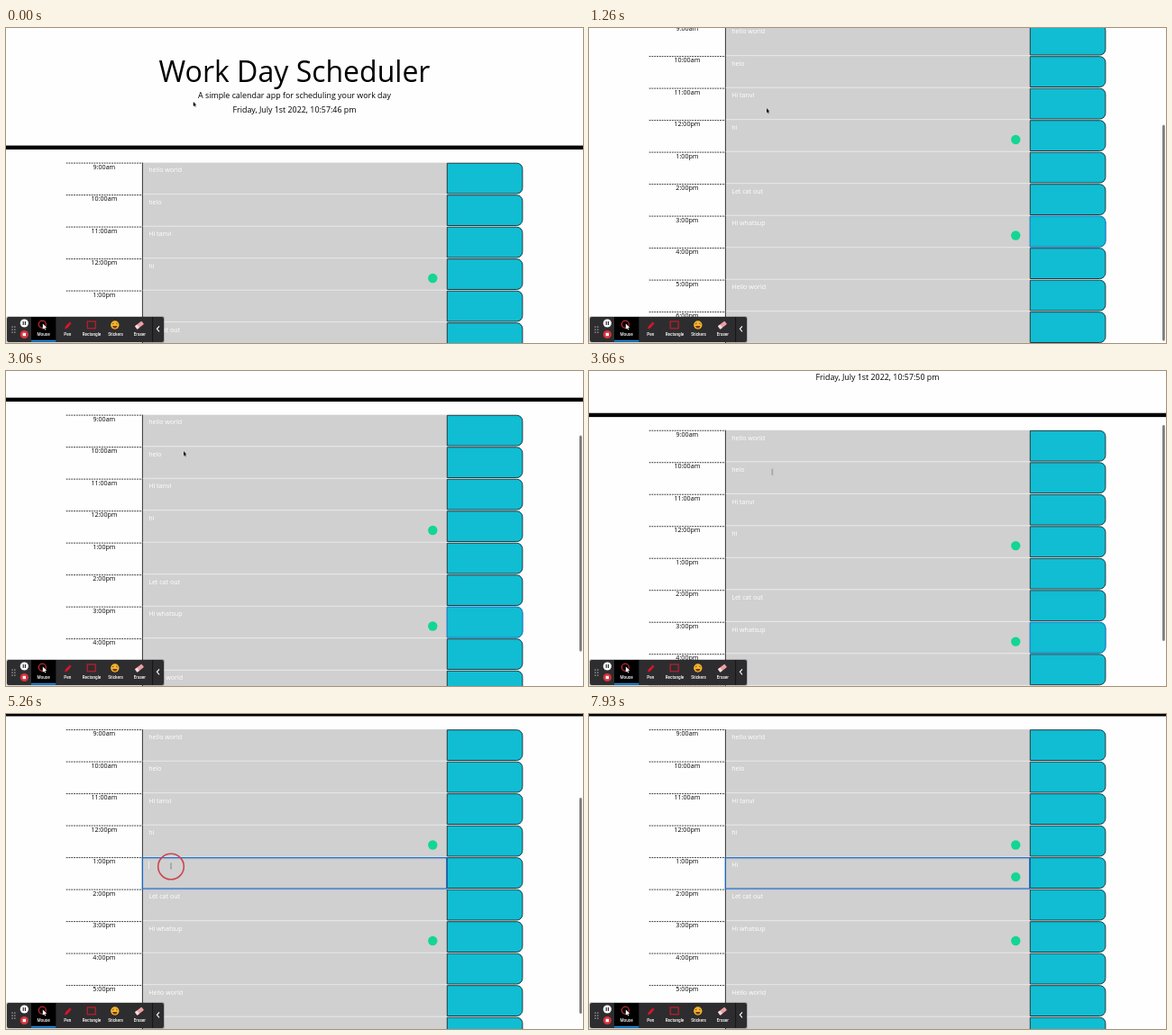
These frames come from a looping animation (640x350 px, 8000 ms). An HTML page:

```html
<!DOCTYPE html>
<html lang="en">
<head>
<meta charset="utf-8">
<title>Work Day Scheduler</title>
<style>
  @property --scroll { syntax: '<number>'; inherits: true; initial-value: 0; }

  html, body { margin: 0; width: 100%; height: 100%; overflow: hidden; background: #fff; }
  svg { display: block; width: 100vw; height: 100vh; font-family: 'Open Sans', sans-serif; }
  #stage { animation: scroll 8s linear infinite; }
  #page { transform: translateY(calc(var(--scroll) * -1px)); }
  /* Past the end of the page the fixed toolbar is dragged along. */
  #toolbar { transform: translateY(calc(max(0, var(--scroll) - 154) * -1px)); }
  #thumb { transform: translateY(calc(3px + min(154, var(--scroll)) * .68px)); animation: thumb 8s linear infinite; }
  #pointer { animation: pointer 8s ease-in-out infinite; }
  #arrow, #beam, #ring, #focus, #caret, #h, #i, #badge, #oldFocus { animation: 8s step-end infinite; }
  #arrow { animation-name: arrow; }
  #beam { animation-name: beam; }
  #ring { animation-name: ring; }
  #focus { animation-name: focus; }
  #oldFocus { animation-name: blur; }
  #caret { animation-name: caret; }
  #h { animation-name: typeH; }
  #i { animation-name: typeI; }
  #badge { animation-name: badge; }

  .center { text-anchor: middle; }
  .lead { font-size: 8.89px; }
  .hour, .note { font-size: 7.11px; }
  .note { fill: #fff; }
  .tool { font: 500 4.6px Roboto, sans-serif; fill: #fff; text-anchor: middle; }

  @keyframes scroll {
    0% { --scroll: 0; }
    8.2% { --scroll: 0; animation-timing-function: cubic-bezier(.3, .3, .6, 1); }
    15.4%, 17.5% { --scroll: 154; animation-timing-function: ease-out; }
    21%, 28.5% { --scroll: 160; }
    30% { --scroll: 154; }
    38.25% { --scroll: 101; animation-timing-function: ease-out; }
    52.5% { --scroll: 77; }
    56.6% { --scroll: 77; animation-timing-function: ease-in-out; }
    62.5%, 100% { --scroll: 132.5; }
  }
  @keyframes thumb {
    0%, 8.2% { opacity: 0; }
    8.3%, 24% { opacity: 1; }
    26%, 29.5% { opacity: 0; }
    29.6%, 66.6% { opacity: 1; }
    68.2%, 100% { opacity: 0; }
  }
  @keyframes pointer {
    0%, .75% { transform: translate(207.7px, 82px); }
    5.7%, 40.7% { transform: translate(197px, 89.2px); }
    52.5%, 56.6% { transform: translate(213.5px, 150px); }
    63%, 100% { transform: translate(183px, 169px); }
  }
  @keyframes arrow { 0% { opacity: 1; } 41.5%, 100% { opacity: 0; } }
  @keyframes beam { 0% { opacity: 0; } 41.5% { opacity: 1; } 91.6%, 100% { opacity: 0; } }
  @keyframes ring { 0% { opacity: 0; } 64.9% { opacity: 1; } 67.5%, 100% { opacity: 0; } }
  @keyframes focus { 0% { opacity: 0; } 64.9%, 100% { opacity: 1; } }
  @keyframes blur { 0% { opacity: 1; } 64.9%, 100% { opacity: 0; } }
  @keyframes caret {
    0% { opacity: 0; transform: none; }
    64.9% { opacity: 1; transform: none; }
    71% { opacity: 0; transform: none; }
    76% { opacity: 1; transform: none; }
    83.2% { opacity: 0; transform: none; }
    89.1% { opacity: 1; transform: none; }
    91.6% { opacity: 1; transform: translateX(5.3px); }
    93.3% { opacity: 1; transform: translateX(7.1px); }
    99%, 100% { opacity: 0; transform: translateX(7.1px); }
  }
  @keyframes typeH { 0% { opacity: 0; } 91.6%, 100% { opacity: 1; } }
  @keyframes typeI { 0% { opacity: 0; } 93.3%, 100% { opacity: 1; } }
  @keyframes badge { 0% { opacity: 0; } 96.5%, 100% { opacity: 1; } }
</style>
</head>
<body>
<svg id="stage" viewBox="0 0 640 350">
  <defs>
    <path id="button" d="M489.3 .6H566.5a6.4 6.4 0 0 1 6.4 6.4V28a6.4 6.4 0 0 1-6.4 6.4H489.3z"/>
  </defs>
  <rect width="640" height="350" fill="#fefefe"/>

  <g id="page">
    <text class="center" x="320" y="59.7" font-size="32">Work Day Scheduler</text>
    <text class="center lead" x="320" y="78">A simple calendar app for scheduling your work day</text>
    <text class="center lead" x="320" y="94" id="clock"></text>
    <rect y="130.6" width="640" height="4.4"/>
    <g id="rows"></g>
    <use id="oldFocus" href="#button" y="362.6" fill="#10bdd3" stroke="#1a86d8"/>
    <g transform="translate(0 291.6)">
      <rect id="focus" x="151.4" y=".6" width="337.4" height="34.4" fill="none" stroke="#1766c4" stroke-width="1.3"/>
      <text id="h" class="note" x="158.2" y="10.8">H</text>
      <text id="i" class="note" x="163.4" y="10.8">i</text>
      <rect id="caret" x="158.1" y="4" width=".6" height="9" fill="#fff"/>
      <circle id="badge" cx="473.3" cy="21.9" r="5.2" fill="#12d694"/>
    </g>
  </g>

  <rect id="thumb" x="636" width="2.8" height="240" rx="1.4" fill="#7d7d7d"/>

  <g id="toolbar">
    <rect x="0" y="320" width="176" height="30" rx="2.5" fill="#000" opacity=".18"/>
    <rect x="1" y="321" width="174" height="28" rx="2" fill="#2d2d2f"/>
    <rect x="28" y="321" width="27.3" height="27.6" fill="#000"/>
    <rect x="28" y="346.8" width="27.3" height="1.8" fill="#1a8fe8"/>
    <path d="M162.6 321v28" stroke="#111" stroke-width=".8"/>
    <path d="M170 331.3l-2.6 3 2.6 3" fill="none" stroke="#fff" stroke-width="1.1"/>
    <path d="M7 331.5v7.5M9.8 331.5v7.5" stroke="#bbb" stroke-width="1.2" stroke-dasharray="1.2 1.8"/>

    <circle cx="20.3" cy="328" r="4.6" fill="#fff"/>
    <path d="M19.2 326v4M21.4 326v4" stroke="#222" stroke-width="1.1"/>
    <circle cx="20.3" cy="340.5" r="4.6" fill="#d8323c"/>
    <rect x="18.6" y="338.8" width="3.4" height="3.4" fill="#fff"/>

    <circle cx="40.3" cy="329.3" r="4" fill="none" stroke="#d8323c" stroke-width="1.1"/>
    <path d="M40.8 328.6v6.2l1.5-1.3 1 2 .9-.5-1-1.9h2z" fill="#fff"/>
    <path d="M65 334.6l1-3 4.6-5.2 2 1.8-4.6 5.2z" fill="#e0142a"/>
    <path d="M69.3 327.8l2 1.8" stroke="#2d2d2f" stroke-width=".5"/>
    <rect x="90.2" y="326" width="9" height="7.8" fill="none" stroke="#d01c2a" stroke-width="1.1"/>
    <circle cx="120.8" cy="330" r="4.7" fill="#f6b62c"/>
    <path d="M118 329l1.5-1M122.2 328l1.5 1" stroke="#5a3510" stroke-width=".9"/>
    <path d="M118.2 331h5.2a2.6 2.4 0 0 1-5.2 0z" fill="#7a3512"/>
    <g transform="rotate(-38 148 330)">
      <rect x="143.2" y="327.9" width="9.4" height="4.4" rx=".8" fill="#eba0a4"/>
      <rect x="143.2" y="327.9" width="3" height="4.4" rx=".8" fill="#f6dcdc"/>
    </g>
    <text class="tool" x="41.6" y="341.7">Mouse</text>
    <text class="tool" x="68.3" y="341.7">Pen</text>
    <text class="tool" x="95" y="341.7">Rectangle</text>
    <text class="tool" x="121.6" y="341.7">Stickers</text>
    <text class="tool" x="148.3" y="341.7">Eraser</text>
  </g>

  <circle id="ring" cx="183" cy="169.5" r="14.3" fill="none" stroke="#cb4650" stroke-width="1.6"/>
  <g id="pointer">
    <path id="arrow" d="M0 0v4.9l1.1-1 .9 1.8.8-.4-.9-1.7h1.6z" stroke="#fff" stroke-width=".4" paint-order="stroke"/>
    <path id="beam" d="M-1-3.2q1 0 1 .7v5q0 .7-1 .7M1-3.2q-1 0-1 .7v5q0 .7 1 .7" fill="none" stroke="#666" stroke-width=".4"/>
  </g>
</svg>

<script>
  const ROW_TOP = 149.6, ROW_PITCH = 35.5;
  const notes = ['hello world', 'helo', 'Hi tanvi', 'hi', '', 'Let cat out', 'Hi whatsup', '', 'Hello world', ''];
  const badgeRows = [3, 6];

  const hourLabel = hour => `${(hour + 11) % 12 + 1}:00${hour < 12 ? 'am' : 'pm'}`;

  const row = (note, n) => `
    <g transform="translate(0 ${ROW_TOP + n * ROW_PITCH})">
      <path d="M66.7 .5H151" stroke="#222" stroke-width=".9" stroke-dasharray="1.8 1"/>
      <text class="hour center" x="108.9" y="7.1">${hourLabel(n + 9)}</text>
      <rect x="151.1" width="337.8" height="35.5" fill="#d0d0d0"/>
      <path d="M151.1 35.2H488.9" stroke="#f4f4f4" stroke-width=".9"/>
      <path d="M151.4 0V35.5" stroke="#222" stroke-width=".9"/>
      <text class="note" x="158.2" y="10.8">${note}</text>
      ${badgeRows.includes(n) ? '<circle cx="473.3" cy="21.9" r="5.2" fill="#12d694"/>' : ''}
      <use href="#button" fill="#10bdd3" stroke="#17292c" stroke-width=".9"/>
    </g>`;

  document.getElementById('rows').innerHTML = notes.map(row).join('');

  const clock = document.getElementById('clock');
  const timeline = document.getElementById('stage').getAnimations()[0];

  function tick(now) {
    const t = (timeline ? timeline.currentTime ?? 0 : now) % 8000;
    const seconds = 46 + Math.floor((t + 800) / 1000);
    clock.textContent = `Friday, July 1st 2022, 10:57:${seconds} pm`;
    requestAnimationFrame(tick);
  }
  tick(performance.now());
</script>
</body>
</html>
```
